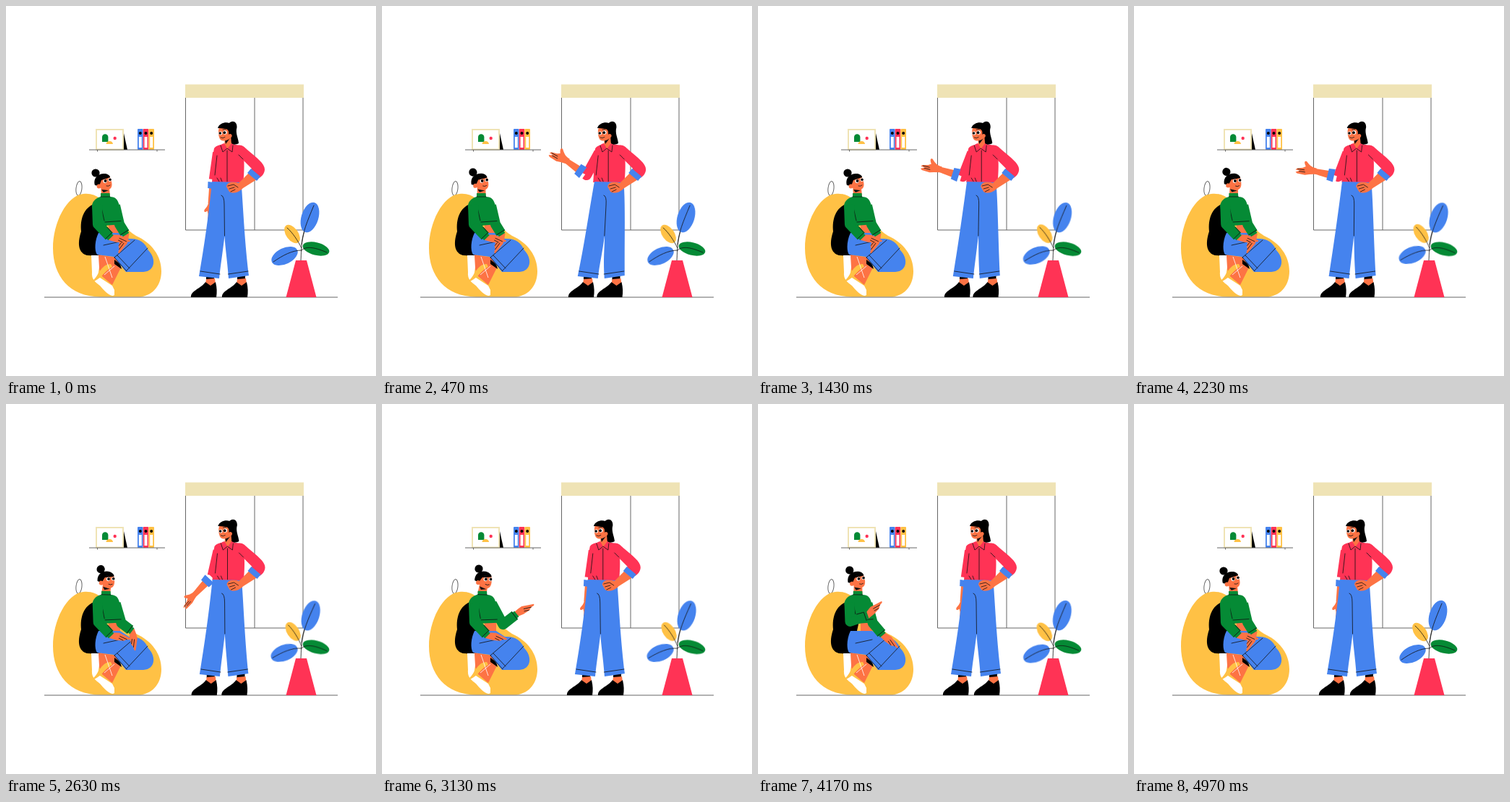
Animation, 512 px wide and 512 px high, one loop 5000 ms. Source, as an HTML page:

```html
<!DOCTYPE html>
<html lang="en">
<head>
<meta charset="utf-8">
<title>Two women talking</title>
<style>
html, body { margin: 0; width: 100%; height: 100%; overflow: hidden; background: #fff; }
svg { display: block; width: 100vw; height: 100vh; }
.skin { fill: #fd7344; } .red { fill: #ff3355; } .blue { fill: #4583ee; }
.green { fill: #058a35; } .yellow { fill: #ffc145; } .cream { fill: #efe3b5; } .white { fill: #fff; }
.line { fill: none; stroke: #111; stroke-width: .8; stroke-linecap: round; stroke-linejoin: round; }
.edge { fill: none; stroke: #666; stroke-width: 1; }
.sleeve { fill: none; stroke-linecap: butt; stroke-linejoin: round; }
.leaf { animation: sway 5s cubic-bezier(.37, 0, .63, 1) infinite; transform-origin: 409px 338px; }
@keyframes sway { 54% { transform: rotate(var(--sway)); } }
</style>
</head>
<body>
<svg viewBox="0 0 512 512">
  <defs>
    <g id="shoe">
      <path d="M277 371H288V379H277Z"/>
      <path class="skin" d="M277 378L289 377L290 385L284 388L276 384Z"/>
      <path d="M256 403C255 394 270 391 276 382L283 387L290 382C292 390 292 396 291 403Z"/>
    </g>
    <g id="binder">
      <rect x="182" y="170" width="7.6" height="29" rx="1"/>
      <rect class="white" x="183.8" y="181" width="4" height="15"/>
      <circle cx="185.8" cy="176" r="2" fill="#000"/>
    </g>
    <g id="hand">
      <path class="skin" d="M-3 -3.6L5 -5L11 -5.5L20 -2.5L27 0C28 2 25 2.5 22 2L18 4.5L8 5L-3 3.6Z"/>
      <path class="line" d="M12 -1L22 2M11 2L17 4"/>
    </g>
  </defs>

  <!-- room -->
  <path class="edge" d="M248.5 127V310H411V127M344 127V310"/>
  <rect class="cream" x="248" y="108.5" width="164" height="18.5"/>
  <path d="M163 176L168 199H162Z"/>
  <rect x="125" y="171" width="37" height="27.5" fill="#fff" stroke="#efe3b5" stroke-width="2"/>
  <path class="green" d="M133 188V181.500A4.200 4.200 0 0 1 141.400 181.500V188Z"/>
  <path class="yellow" d="M138.500 191A4.800 4.800 0 0 1 148 191Z"/>
  <circle class="red" cx="150.700" cy="183" r="2.200"/>
  <use href="#binder" class="blue"/>
  <use href="#binder" class="red" x="7.700"/>
  <use href="#binder" class="yellow" x="15.400"/>
  <path class="edge" d="M115 199H220M126.500 199V201.500M209 199V201.500"/>

  <!-- beanbag -->
  <ellipse class="edge" cx="101" cy="252.500" rx="4" ry="10" transform="rotate(6 101 252)"/>
  <path class="yellow" d="M107 260C84 262 65 300 65 335C65 374 88 402 130 402.500H186C205 400 215 385 215 367C215 346 202 328 180 318C150 300 140 256 107 260Z"/>
  <path d="M122 274C108 279 102 295 104 312C98 330 101 342 112 345L130 346L140 300Z"/>
  <path class="edge" d="M53 403H459"/>

  <!-- seated woman -->
  <path class="skin" d="M128 344L152 348L159 362L147 386L133 374L126 357Z"/>
  <path class="white" d="M118 345H128L129 362L127 374L147 387L150 393V400C145 404 136 394 130 387C124 382 118 379 119 368Z"/>
  <path class="yellow" d="M120 380C128 374 131 357 145 357L147 361C139 364 133 376 122 381Z"/>
  <path d="M137 347L147 376M150 360L136 372" stroke="#fff" stroke-width=".8"/>
  <path d="M150 351L158 357L160 364L150 357Z"/>
  <path class="skin" d="M142 300H158V317H142Z"/>
  <path class="blue" d="M128 314C123 324 122 338 126 344L149 347L166 368H190C207 367 208 349 197 338C192 326 183 321 170 322L158 314H140Z"/>
  <path class="line" d="M135 331L158 326M150 348L178 324M167 366L196 335M150 348L167 367M154 345L171 363"/>
  <g id="farArm"></g>
  <g id="upper">
    <g id="head">
      <path class="skin" d="M131 247L143 252L144 263H132Z"/>
      <path d="M132 254L142 255L135 258Z" fill="#111"/>
      <path class="skin" d="M129 239L143 235C147 243 148 250 144 253C138 256 131 253 129 249Z"/>
      <circle cx="124" cy="231" r="5.600"/>
      <path d="M123 248C120 237 129 231 138 232C142 233 144 235 144 237L132 241L129 249Z"/>
      <circle class="skin" cx="128.600" cy="249.500" r="3"/>
      <g class="white"><circle cx="137" cy="242.300" r="2.600"/><circle cx="143.700" cy="240.500" r="2.400"/></g>
      <circle cx="137.500" cy="242" r="1.900"/><circle cx="144" cy="240.200" r="1.800"/>
      <path class="line" d="M139 249Q142 250 144 248M134 238L138 237"/>
    </g>
    <path class="green" d="M131 259H143.500L144 264C152 264 155 268 157 277L160 302L136 304C126 298 120 290 119 276C120 269 126 265 131 264Z"/>
    <path class="line" d="M131 264H144M137 299L159 297.500M132 279L136 297"/>
  </g>
  <g id="nearArm"></g>

  <!-- standing woman -->
  <g id="outArm"></g>
  <use id="leftShoe" href="#shoe"/>
  <use id="rightShoe" href="#shoe"/>
  <g id="torso">
    <path class="red" d="M297 192L303 191L306 198L312 191L324 193C331 202 330 225 328.500 244H285C287 225 285 210 288 197C290 194 293 193 297 192Z"/>
    <path class="line" d="M306 200V243M292 207L289 234M295 243L292 238M299 243L297 238"/>
  </g>
  <path id="trousers" class="blue"/>
  <path id="seams" class="line"/>
  <g id="hipArm">
    <path class="red" d="M320 193C326 191 330 195 334 199C347 210 358 218 358 226C358 232 353 237 350 238L337 228L340 225L326 211Z"/>
    <path class="skin" d="M336 231L347 240L328 252C321 259 314 260 309 257L305 250C306 243 314 243 322 245Z"/>
    <path class="blue" d="M339 225L352 236L347 242L334 231Z"/>
    <path class="line" d="M322 206L328 212M307 249L315 247L321 251M309 253L316 251M311 257L317 254"/>
  </g>
  <g id="face">
    <path d="M308 163C313 157 320 160 319.500 168C317 176 322 184 322 190C319 192 314 192 312 191L306 173Z"/>
    <path class="skin" d="M303 182L311 178L312 192L306 199L302 193Z"/>
    <path d="M303 186L310 183L304 191Z" fill="#111"/>
    <path class="skin" d="M295 168C293 174 294 180 296 184C299 188 306 187 310 183L312 171L304 165Z"/>
    <path d="M293 169C295 162 304 160 309 162L315 170L313 179L308 178C309 173 307 170 303 170C299 169 296 169 293 169Z"/>
    <circle class="skin" cx="310" cy="179.500" r="2.600"/>
    <g class="white"><circle cx="296.700" cy="176" r="2.500"/><circle cx="303" cy="175" r="2.700"/></g>
    <circle cx="296.300" cy="176" r="1.800"/><circle cx="302.300" cy="175.200" r="1.900"/>
    <path class="line" d="M297 182Q300 184 303 181.500M300 171L304 171"/>
    <path class="red" d="M299 191L302 190L306 197L300 202L297 193ZM312 190L315 192L313 202L306 198Z"/>
    <path class="line" d="M297 193L300 202L306 197L313 202L314 193"/>
  </g>

  <!-- plant -->
  <path class="line" d="M408 352C409 338 407 325 418 297"/>
  <g class="leaf" style="--sway: 1.500deg">
    <ellipse class="blue" cx="420.500" cy="292.500" rx="11.800" ry="21.500" transform="rotate(17 420.500 292.500)"/>
    <path class="line" d="M409 330C411 312 416 300 426 276"/>
  </g>
  <g class="leaf" style="--sway: 3deg">
    <ellipse class="yellow" cx="396" cy="315.500" rx="8.300" ry="14.500" transform="rotate(-36 396 315.500)"/>
    <path class="line" d="M409 335C404 325 397 314 389 307"/>
  </g>
  <g class="leaf" style="--sway: 1deg">
    <ellipse class="green" cx="429" cy="336" rx="18.800" ry="8.800" transform="rotate(14 429 336)"/>
    <path class="line" d="M409 338C416 331 430 335 444 341"/>
  </g>
  <g class="leaf" style="--sway: 4deg">
    <ellipse class="blue" cx="385.500" cy="346" rx="19.500" ry="11" transform="rotate(-26 385.500 346)"/>
    <path class="line" d="M409 338C396 338 383 345 370 354"/>
  </g>
  <path class="red" d="M401 352H416L429.500 403H387.500Z"/>
</svg>
<script>
const LOOP = 5000, RAD = Math.PI / 180;
const el = id => document.getElementById(id);
const smooth = u => u * u * (3 - 2 * u);

// Each key: time, then the pose values, eased from one key to the next.
const tracks = {
  hip: [[0, 0], [490, 9], [1000, 4.5], [1500, 4], [2250, 3], [2850, -.4], [3600, 0]],
  out: [[0, 0], [450, 1], [2250, 1], [2900, 0]],
  // upper angle, forearm angle, hand angle, hand width
  talk: [[0, 98, 98, 95, .6], [490, 119, 216, 203, 1], [1000, 112, 200, 190, 1],
    [1500, 111, 197, 187, 1], [2250, 111, 193, 182, 1], [2900, 98, 98, 95, .6]],
  head: [[0, 0], [470, 4], [1400, 0], [1800, 0], [2300, 7], [3000, 15], [3400, 14], [4150, 3], [4700, 0]],
  lean: [[0, 0], [1800, 0], [3100, 2], [4200, 1], [4800, 0]],
  // upper angle and length, forearm angle and length, hand angle
  far: [[0, 77, 27, 58, 17, 110], [2450, 77, 27, 58, 17, 110], [3050, 62, 33, -38, 24, -30],
    [3450, 62, 33, -38, 24, -30], [4050, 75, 28, 50, 22, 38], [4350, 75, 28, 50, 22, 38], [4930, 77, 27, 58, 17, 110]],
  near: [[0, 88, 27, 46, 26, 8], [3480, 88, 27, 46, 26, 8], [4080, 88, 26, -19, 26, -46],
    [4380, 88, 26, -19, 26, -46], [5000, 88, 27, 46, 26, 8]]
};

function pose(name, t) {
  const keys = tracks[name];
  const next = keys.findIndex(k => k[0] > t);
  if (next < 0) return keys[keys.length - 1].slice(1);
  const a = keys[next - 1], b = keys[next];
  const u = smooth((t - a[0]) / (b[0] - a[0]));
  return a.slice(1).map((v, i) => v + (b[i + 1] - v) * u);
}

const reach = ([x, y], angle, length) =>
  [x + Math.cos(angle * RAD) * length, y + Math.sin(angle * RAD) * length];
const shift = (id, x) => el(id).setAttribute("transform", `translate(${x} 0)`);
const place = ([x, y], angle, sy = 1) => `transform="translate(${x} ${y}) rotate(${angle}) scale(1 ${sy})"`;

function seatedArm(id, shoulder, [a1, l1, a2, l2, hand], near) {
  const elbow = reach(shoulder, a1, l1), wrist = reach(elbow, a2, l2);
  el(id).innerHTML = `
    <use href="#hand" ${place(wrist, hand)}/>
    <path class="sleeve" stroke="#058a35" stroke-width="14" d="M${shoulder}L${elbow}L${reach(elbow, a2, l2 - 3)}"/>
    <path class="sleeve" stroke="#058a35" stroke-width="10" d="M${elbow}L${wrist}"/>
    <path class="line" ${place(wrist, a2)} d="M-4 -6V6${near ? "M-14 -6.500L-5 -6" : ""}"/>`;
}

function talkingArm(hip, [a1, a2, hand, width]) {
  const shoulder = [293 + hip * .8, 203], elbow = reach(shoulder, a1, 35.5);
  el("outArm").innerHTML = `
    <g ${place(reach(elbow, a2, 35), hand, width)}>
      <path class="skin" d="M-4 -4V4C3 5 6 8 10 13C13 14 14 12 11 6L15 4L23 3L25 1L19 0L25 -2L23 -4L12 -6L6 -5Z"/>
      <path class="line" d="M13 1L22 2M12 -2L20 -1"/>
    </g>
    <path class="skin" ${place(elbow, a2)} d="M8 -5.500L36 -3.500V3.500L8 5.500Z"/>
    <path class="sleeve" stroke="#ff3355" stroke-width="14" stroke-linecap="round" d="M${shoulder}L${elbow}L${reach(elbow, a2, 2)}"/>
    <path class="blue" ${place(elbow, a2, .65 + width * .35)} d="M6 -9L15 -8V8L6 9Z"/>`;
}

function legs(h, out) {
  const l = 2 * out + .2 * h, r = -2 * out + .2 * h, k = h * .6;
  el("trousers").setAttribute("d", `M${285 + h} 243L${325.5 + h} 244
    C${328 + h} 275 ${330 + k} 325 ${336 + r} 373L${308 + r} 377
    C${306 + r} 350 ${303 + k} 332 ${302.5 + k} 318
    C${300 + k} 340 ${297 + l} 358 ${295 + l} 377L${267 + l} 374
    C${275 + k} 328 ${281 + k} 285 ${285 + h} 243Z`);
  el("seams").setAttribute("d", `M${298 + h} 262Q${302 + h} 263 ${302 + h * .9} 275L${302.5 + k} 318
    M${269 + l} 367L${296 + l} 371M${307.5 + r} 371L${335 + r} 367`);
  shift("leftShoe", 2 * out);
  shift("rightShoe", 43 - 1.5 * out);
}

function draw(now) {
  const t = now % LOOP;
  const [hip] = pose("hip", t), [out] = pose("out", t);
  const [head] = pose("head", t), [lean] = pose("lean", t);
  talkingArm(hip, pose("talk", t));
  legs(hip, out);
  shift("torso", hip * .8);
  shift("hipArm", hip * .8);
  shift("face", hip * .55);
  el("head").setAttribute("transform", `rotate(${head} 138 258)`);
  el("upper").setAttribute("transform", `rotate(${lean} 142 305)`);
  seatedArm("farArm", [151 + lean * .5, 276], pose("far", t), false);
  seatedArm("nearArm", [126 + lean * .5, 275], pose("near", t), true);
  requestAnimationFrame(draw);
}
requestAnimationFrame(draw);
</script>
</body>
</html>
```
